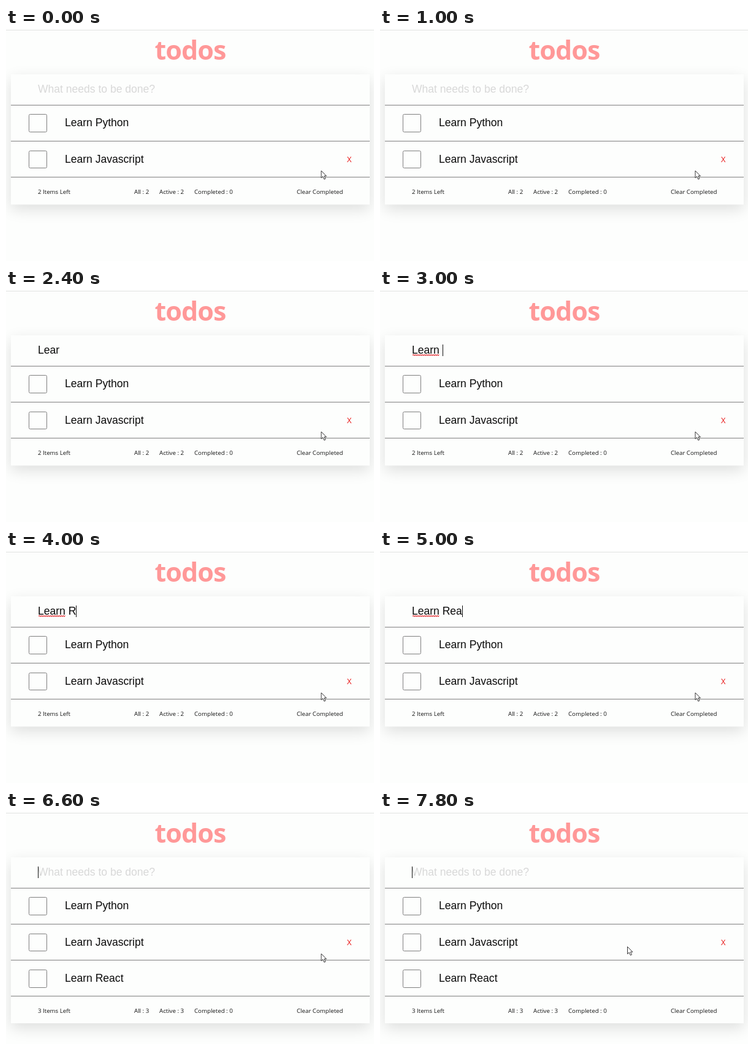
Animation, 600 px wide and 382 px high, one loop 8000 ms. Source, as an HTML page:

```html
<!DOCTYPE html>
<html lang="en">
<head>
<meta charset="utf-8">
<title>todos</title>
<style>
  html, body { margin: 0; width: 100%; height: 100%; overflow: hidden; background: #fdfefd; }
  svg { display: block; width: 100%; height: 100%; }
  text { white-space: pre; }
  .body { font: 17.55px "Liberation Sans", Arial, sans-serif; fill: #0a0a0a; }
  .hint { fill: #d8d8d8; }
  .title { font: bold 43px "Open Sans", "Noto Sans", sans-serif; letter-spacing: -0.9px; fill: #ff9898; }
  .small { font: 9.7px "Open Sans", "Noto Sans", sans-serif; fill: #141414; }
  .remove { font: 12.8px "Open Sans", "Noto Sans", sans-serif; fill: #e81212; }
  .rule { stroke: #7e7e7e; }
  .box { fill: #fdfefd; stroke: #7e7e7e; }
</style>
</head>
<body>
<svg viewBox="0 0 600 382">
  <defs>
    <filter id="blur" filterUnits="userSpaceOnUse" x="-60" y="0" width="720" height="460">
      <feGaussianBlur stdDeviation="12"/>
    </filter>
  </defs>
  <rect width="600" height="382" fill="#fdfefd"/>
  <rect id="shadow" x="8" y="84" width="585" filter="url(#blur)" opacity="0.12"/>
  <path d="M0 3.5H600" stroke="#e2e2e2"/>
  <text class="title" x="300.5" y="51.5" text-anchor="middle">todos</text>
  <rect id="card" x="8" y="76" width="585" fill="#fdfefd"/>
  <path class="rule" d="M8 126.5H593"/>
  <text id="hint" class="body hint" x="52" y="106">What needs to be done?</text>
  <text id="entry" class="body" x="52" y="106"></text>
  <path id="squiggle" fill="none" stroke="#e23034" stroke-width="1.1"/>
  <rect id="caret" y="91" width="1" height="19" fill="#111"/>
  <g id="rows"></g>
  <text class="remove" x="556" y="220">X</text>
  <g id="footer">
    <text id="left" class="small" x="52" y="272"></text>
    <text id="all" class="small" x="209" y="272"></text>
    <text id="active" class="small" x="250" y="272"></text>
    <text class="small" x="307" y="272">Completed : 0</text>
    <text class="small" x="474" y="272">Clear Completed</text>
  </g>
  <path id="pointer" d="M0 0V11.8L2.7 9.4L4.8 14L6.9 13.1L4.9 8.6H8.4Z"
        fill="#fff" stroke="#222" stroke-width="0.9" stroke-linejoin="round"/>
</svg>
<script>
const LOOP = 8000;
const ROW = 59.3;
const SUBMIT = 6600;

// [start in ms, value]
const typing = [
  [0, ""], [1200, "L"], [1600, "Lea"], [1800, "Lear"], [2800, "Learn"], [3000, "Learn "],
  [4000, "Learn R"], [4200, "Learn Re"], [5000, "Learn Rea"], [5200, "Learn Reac"],
  [5600, "Learn React"], [SUBMIT, ""]
];
const blinking = [
  [0, false], [600, true], [1000, false], [1200, true], [2400, false], [2800, true],
  [3400, false], [4000, true], [4800, false], [5000, true], [6000, false],
  [SUBMIT, true], [7200, false], [7600, true]
];
const pointing = [[0, [514, 234]], [7600, [513, 234]], [7800, [403.5, 222.5]]];

const $ = id => document.getElementById(id);
const at = (track, t) => track.findLast(([start]) => t >= start)[1];
const show = (el, on) => el.setAttribute("visibility", on ? "visible" : "hidden");

$("rows").innerHTML = ["Python", "Javascript", "React"].map((name, i) => {
  const snap = y => Math.round(y + i * ROW);
  const top = snap(141.4) + 0.5;
  const bottom = snap(170) + 0.5;
  return `<g><rect class="box" x="37.5" y="${top}" width="29" height="${bottom - top}" rx="2"/>
    <text class="body" x="96" y="${snap(161.3)}">Learn ${name}</text>
    <path class="rule" d="M8 ${snap(184.7) + 0.5}H593"/></g>`;
}).join("");

let wave = "M53 108.5";
for (let x = 54.5, up = true; x < 98; x += 1.5, up = !up) wave += `L${x} ${up ? 107.5 : 109.2}`;
$("squiggle").setAttribute("d", wave);

function draw(t) {
  const typed = at(typing, t);
  const added = t >= SUBMIT;
  const count = added ? 3 : 2;
  const shift = added ? ROW : 0;

  $("entry").textContent = typed;
  show($("hint"), !typed);
  show($("squiggle"), typed.startsWith("Learn "));
  const width = typed ? $("entry").getComputedTextLength() : 0;
  $("caret").setAttribute("x", Math.floor(52.4 + width));
  show($("caret"), at(blinking, t));

  show($("rows").lastElementChild, added);
  const height = added ? 272 : 213.5;
  $("card").setAttribute("height", height);
  $("shadow").setAttribute("height", height);
  $("footer").setAttribute("transform", `translate(0 ${shift})`);
  $("left").textContent = `${count} Items Left`;
  $("all").textContent = `All : ${count}`;
  $("active").textContent = `Active : ${count}`;
  $("pointer").setAttribute("transform", `translate(${at(pointing, t)})`);
}

const begin = performance.now();
function tick() {
  draw((performance.now() - begin) % LOOP);
  requestAnimationFrame(tick);
}
tick();
</script>
</body>
</html>
```
